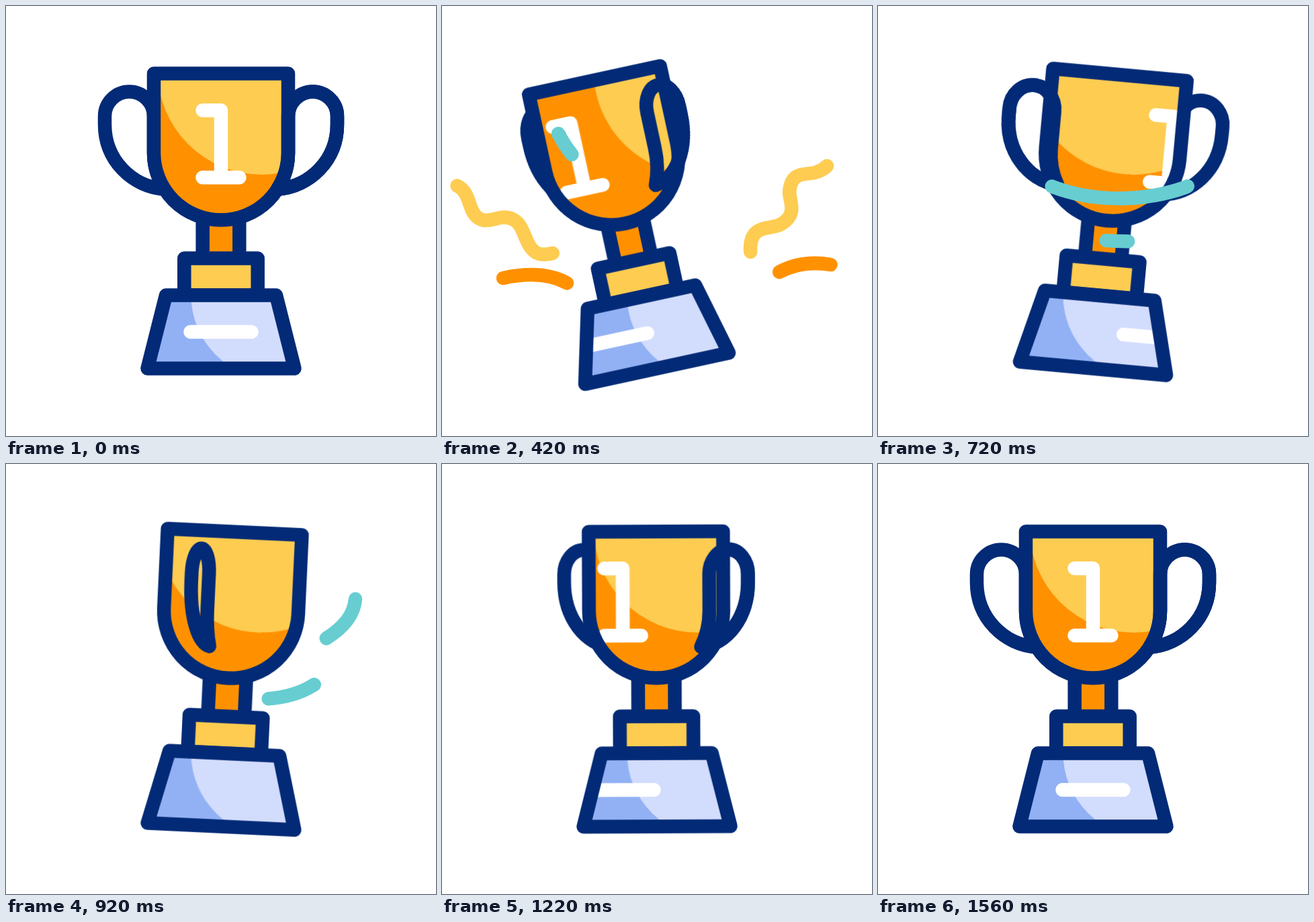
An HTML page without scripts for the animation above (2.4 s loop, 640 by 640 pixels).

```html
<!DOCTYPE html>
<html lang="en">
<head>
<meta charset="utf-8">
<title>Trophy</title>
<style>
  html, body { margin: 0; width: 100%; height: 100%; overflow: hidden; background: #fff; }
  svg { display: block; width: 100%; height: 100%; }

  .line { fill: none; stroke: #032a76; stroke-width: 20.5; stroke-linejoin: round; stroke-linecap: round; }
  .mark { fill: none; stroke: #fff; stroke-width: 20.5; stroke-linejoin: round; stroke-linecap: round; }
  .trail { fill: none; stroke-width: 20.5; stroke-linecap: round; opacity: 0; }
  .orange { fill: #ff9100; }
  .yellow { fill: #fdcc51; }
  .orange-trail { stroke: #ff9100; }
  .yellow-trail { stroke: #fdcc51; }
  .teal-trail { stroke: #67cdd1; }

  .sway, .steady { transform-origin: 320px 539.5px; }
  .sway { animation: sway 2400ms ease-in-out infinite; }
  .steady { animation: steady 2400ms ease-in-out infinite; }
  .slide { animation: slide 2400ms ease-in-out infinite; }
  .handle { animation: turn 2400ms ease-in-out infinite; }
  .front-first { animation: turn 2400ms ease-in-out infinite, first 2400ms step-end infinite; }
  .front-second { animation: turn 2400ms ease-in-out infinite, second 2400ms step-end infinite; }
  .burst { animation: burst 2400ms linear infinite; }
  .swirl { animation: swirl 2400ms linear infinite; }
  .low-swirl { animation: low-swirl 2400ms linear infinite; }

  @keyframes sway {
    0%, 65%, 100% { transform: rotate(0deg); }
    15% { transform: rotate(-13deg); }
    33.3% { transform: rotate(6.5deg); }
    45.4% { transform: rotate(-4deg); }
    55.4% { transform: rotate(2.5deg); }
  }
  /* Exact inverse of sway: keeps the shading still while the body tilts. */
  @keyframes steady {
    0%, 65%, 100% { transform: rotate(0deg); }
    15% { transform: rotate(13deg); }
    33.3% { transform: rotate(-6.5deg); }
    45.4% { transform: rotate(4deg); }
    55.4% { transform: rotate(-2.5deg); }
  }
  @keyframes slide {
    0% { transform: translateX(0); }
    15% { transform: translateX(-52px); }
    60%, 100% { transform: translateX(540px); }
  }

  /* The handle's width shrinks, recovers, then passes through zero to the other side. */
  @keyframes turn {
    0%, 25.4% { d: path("M-84 272.5C-94 257 -100 239 -100 218.5L-100 164C-100 144 -116.5 127.5 -136.5 127.5C-156.5 127.5 -173 144 -173 164L-173 176C-173 229 -133 269 -84 272.5Z"); }
    15% {
      d: path("M-53.8 272.5C-60.2 257 -64 239 -64 218.5L-64 164C-64 144 -74.6 127.5 -87.4 127.5C-100.2 127.5 -110.7 144 -110.7 164L-110.7 176C-110.7 229 -85.1 269 -53.8 272.5Z");
      animation-timing-function: cubic-bezier(.6, 0, .6, 1);
    }
    58.3%, 100% { d: path("M84 272.5C94 257 100 239 100 218.5L100 164C100 144 116.5 127.5 136.5 127.5C156.5 127.5 173 144 173 164L173 176C173 229 133 269 84 272.5Z"); }
  }
  @keyframes first { 0% { visibility: visible; } 25.4%, 100% { visibility: hidden; } }
  @keyframes second { 0% { visibility: hidden; } 25.4%, 100% { visibility: visible; } }

  @keyframes burst {
    0% { stroke-dasharray: 0 300; stroke-dashoffset: 0; }
    0%, 1.6% { opacity: 0; }
    1.65%, 28.2% { opacity: 1; }
    3.75% { stroke-dasharray: 9 300; stroke-dashoffset: -1; }
    7.5% { stroke-dasharray: 37 300; stroke-dashoffset: -5; }
    11.25% { stroke-dasharray: 63 300; stroke-dashoffset: -12; }
    13.75% { stroke-dasharray: 74 300; stroke-dashoffset: -19; }
    16.7% { stroke-dasharray: 70 300; stroke-dashoffset: -30; }
    20% { stroke-dasharray: 55 300; stroke-dashoffset: -45; }
    22.5% { stroke-dasharray: 41 300; stroke-dashoffset: -59; }
    25.4% { stroke-dasharray: 22 300; stroke-dashoffset: -78; }
    28.25%, 100% { stroke-dasharray: 0 300; stroke-dashoffset: -100; opacity: 0; }
  }
  @keyframes swirl {
    0%, 14.6% { stroke-dasharray: 0 300; stroke-dashoffset: 0; opacity: 0; }
    14.65%, 41.6% { opacity: 1; }
    17.5% { stroke-dasharray: 8.5 300; stroke-dashoffset: -2.5; }
    20.8% { stroke-dasharray: 21 300; stroke-dashoffset: -7; }
    23.75% { stroke-dasharray: 33 300; stroke-dashoffset: -13; }
    26.7% { stroke-dasharray: 43 300; stroke-dashoffset: -20; }
    30% { stroke-dasharray: 48 300; stroke-dashoffset: -30; }
    33.3% { stroke-dasharray: 45 300; stroke-dashoffset: -47; }
    35.8% { stroke-dasharray: 35 300; stroke-dashoffset: -64; }
    38.3% { stroke-dasharray: 18 300; stroke-dashoffset: -82; }
    41.65%, 100% { stroke-dasharray: 0 300; stroke-dashoffset: -100; opacity: 0; }
  }
  @keyframes low-swirl {
    0%, 27.5% { stroke-dasharray: 0 300; stroke-dashoffset: 0; opacity: 0; }
    27.55%, 48.3% { opacity: 1; }
    30% { stroke-dasharray: 18 300; stroke-dashoffset: -4; }
    33.3% { stroke-dasharray: 32 300; stroke-dashoffset: -10; }
    35.8% { stroke-dasharray: 38 300; stroke-dashoffset: -19; }
    38.3% { stroke-dasharray: 40 300; stroke-dashoffset: -32; }
    41.7% { stroke-dasharray: 35 300; stroke-dashoffset: -55; }
    44.2% { stroke-dasharray: 24 300; stroke-dashoffset: -75; }
    46.7% { stroke-dasharray: 10 300; stroke-dashoffset: -90; }
    48.35%, 100% { stroke-dasharray: 0 300; stroke-dashoffset: -100; opacity: 0; }
  }
</style>
</head>
<body>
<svg viewBox="0 0 640 640">
  <defs>
    <path id="cup" d="M220 100.5H420V218.5A100 100 0 0 1 220 218.5Z"/>
    <path id="plinth" d="M238 430.5H402L429.5 539.5H210.5Z"/>
    <path id="one" d="M292.5 155.3H320V255.3M292.5 255.3H347.5"/>
    <path id="dash" d="M274.5 485H365.5"/>
    <clipPath id="cup-clip"><use href="#cup"/></clipPath>
    <clipPath id="plinth-clip"><use href="#plinth"/></clipPath>
  </defs>

  <g class="sway">
    <path class="line handle" transform="translate(320)"/>
    <path class="line handle" transform="translate(320) scale(-1 1)"/>

    <path class="orange" d="M292.7 318H347.3V375.5H292.7Z"/>
    <path class="line" d="M292.7 318V375.5M347.3 318V375.5"/>

    <g clip-path="url(#cup-clip)">
      <use href="#cup" class="orange"/>
      <circle class="yellow steady" cx="381" cy="95.5" r="155.5"/>
      <g class="mark slide">
        <use href="#one"/>
        <use href="#one" x="-540"/>
      </g>
    </g>
    <use href="#cup" class="line"/>

    <path class="yellow line" style="fill:#fdcc51" d="M265.3 375.5H374.7V430.5H265.3Z"/>

    <g clip-path="url(#plinth-clip)">
      <use href="#plinth" fill="#92b1f4"/>
      <circle class="steady" fill="#d2dcfd" cx="402" cy="430" r="126.6"/>
      <!-- fills the area right of the curve's centre -->
      <g class="mark slide">
        <use href="#dash"/>
        <use href="#dash" x="-540"/>
      </g>
    </g>
    <use href="#plinth" class="line"/>

    <path class="line front-second" transform="translate(320)"/>
    <path class="line front-first" transform="translate(320) scale(-1 1)"/>
  </g>

  <path class="trail burst yellow-trail" pathLength="100" d="M232 428C206 412 215 366 181 365.5C166 365.5 160 372 145 369C118 361 128 315 93 314.5C80 315 76 320 62 319C36 313 46 278 22.5 267.5"/>
  <path class="trail burst yellow-trail" pathLength="100" d="M398 432C415 405 440 412 455 398C468 385 460 375 459 364C458 325 485 333 502 326C530 312 518 292 517 278C519 242 545 253 558 247Q567 244 573 238"/>
  <path class="trail burst orange-trail" pathLength="100" d="M221 447Q184 385 91 405"/>
  <path class="trail burst orange-trail" pathLength="100" d="M470 420Q516 374 578.5 385"/>
  <path class="trail swirl teal-trail" pathLength="100" d="M168 180C190 225 215 250 260 269C320 292 395 292 457 270C500 250 518 225 520 201"/>
  <path class="trail low-swirl teal-trail" pathLength="100" d="M332 348.5C395 354 430 346 456 330C475 319 488 308 496 296"/>
</svg>
</body>
</html>
```
